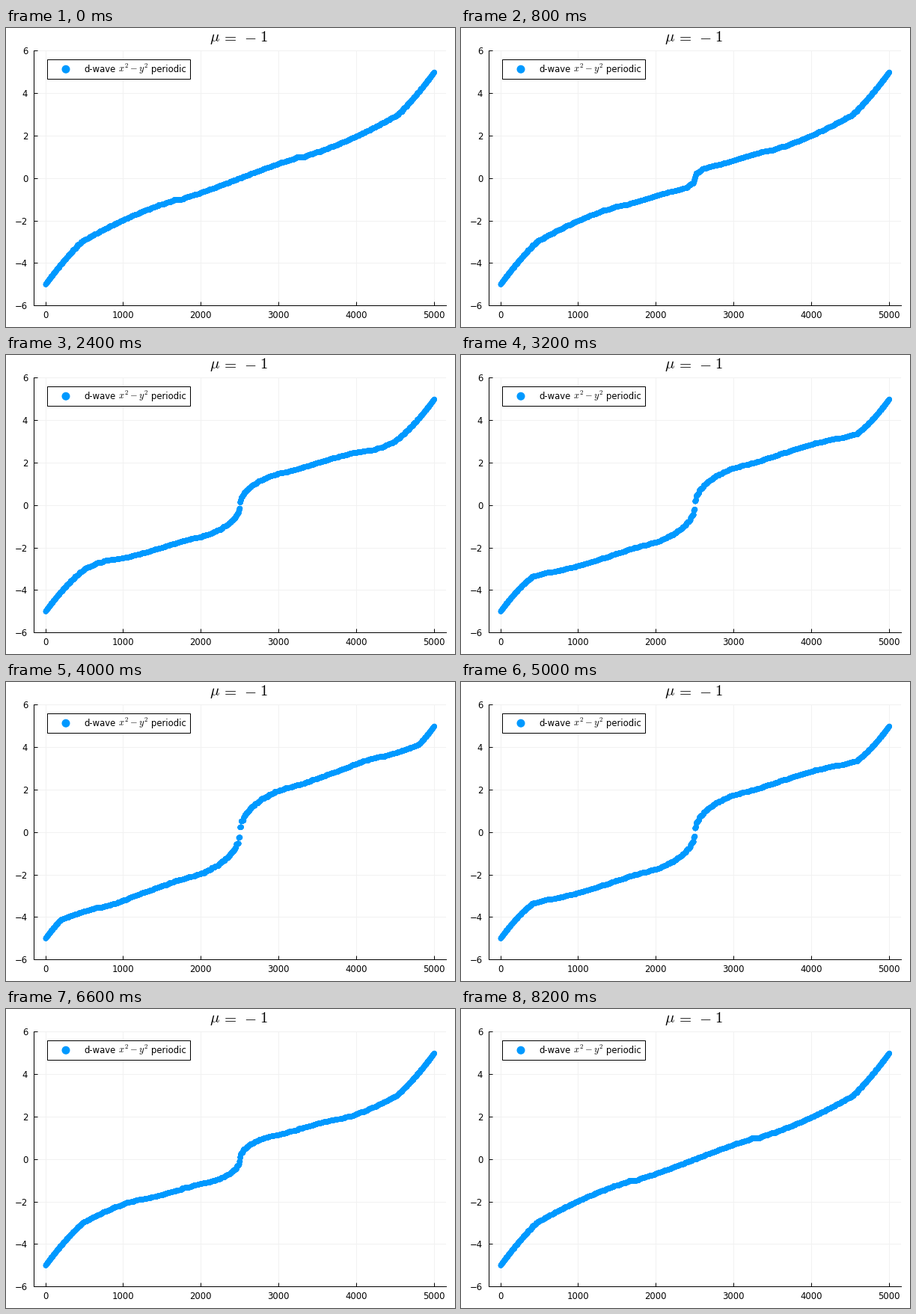
Write a matplotlib script that moves like this. It is 600x400 px and loops after 8.4 s.

```python
import numpy as np
import matplotlib.pyplot as plt
from matplotlib.animation import FuncAnimation
from matplotlib.patches import Rectangle, Circle
from matplotlib.transforms import Affine2D

W, H, DPI = 600, 400, 100
PT = 72 / DPI  # points per pixel
BLUE = "#0099ff"
SITES = 50     # lattice sites per side
MU = -1
STEPS = 20
FRAMES = 2 * (STEPS + 1)
COUNT = 2 * SITES ** 2

plt.rcParams.update({
    "font.family": "DejaVu Sans",
    "mathtext.fontset": "cm",
    "axes.unicode_minus": True,
})

k = 2 * np.pi * np.arange(SITES) / SITES
kx, ky = np.meshgrid(k, k)
band = -2 * (np.cos(kx) + np.cos(ky)) - MU
d_wave = 2 * (np.cos(kx) - np.cos(ky))
index = np.arange(1, COUNT + 1)


def spectrum(delta):
    """Sorted quasiparticle energies for pairing strength delta."""
    energy = np.hypot(band, delta * d_wave).ravel()
    return np.sort(np.concatenate([-energy, energy]))


def points(step):
    return np.column_stack([index, spectrum(step / STEPS)])


fig = plt.figure(figsize=(W / DPI, H / DPI), dpi=DPI, facecolor="white")

# Plot area, given by its edges in pixels
left, right, top, bottom = 37.05, 587.55, 30.25, 371.25
ax = fig.add_axes([left / W, 1 - bottom / H, (right - left) / W, (bottom - top) / H])
margin = 0.03 * (COUNT - 1)
ax.set_xlim(1 - margin, COUNT + margin)
ax.set_ylim(-6, 6)
ax.set_xticks(range(0, 5001, 1000))
ax.set_yticks(range(-6, 7, 2))
ax.set_axisbelow(True)
ax.grid(color="#f1f1f1", linewidth=PT)
ax.tick_params(direction="in", length=5 * PT, width=PT, labelsize=11.6 * PT)
ax.tick_params(axis="x", pad=6.4 * PT)
ax.tick_params(axis="y", pad=7.9 * PT)
for side in ("top", "right"):
    ax.spines[side].set_visible(False)
for side in ("left", "bottom"):
    ax.spines[side].set_linewidth(PT)

# One colour per point keeps the markers at sub-pixel positions;
# the half-pixel shift centres them on the snapped grid lines
dots = ax.scatter(index, spectrum(0), s=(7 * PT) ** 2, c=[BLUE] * COUNT,
                  linewidths=0, clip_on=False, zorder=3)
dots.set_offset_transform(ax.transData + Affine2D().translate(0.5, -0.5))

# Overlay in pixel coordinates for title and legend
over = fig.add_axes([0, 0, 1, 1])
over.set_xlim(0, W)
over.set_ylim(H, 0)
over.axis("off")


def label(x, y, text, size, ha="left"):
    over.text(x, y, text, fontsize=size * PT, ha=ha, va="baseline")


for x, part in ((279, r"$\mu$"), (298.7, "$=$"), (326.3, "$-$"), (344, "$1$")):
    label(x, 18, part, 20.8, "center")

over.add_patch(Rectangle((55, 42), 191, 26, facecolor="white",
                         edgecolor="black", linewidth=PT))
over.add_patch(Circle((80, 55.2), 5.5, facecolor=BLUE, linewidth=0))
label(104, 59, "d-wave", 11.6)
label(150, 59, "$x^2-y^2$", 12.5)
label(194, 59, "periodic", 11.6)


def update(frame):
    dots.set_offsets(points(min(frame, FRAMES - 1 - frame)))
    return (dots,)


anim = FuncAnimation(fig, update, frames=FRAMES, interval=200,
                     repeat=True, repeat_delay=0, blit=False)
plt.show()
```
